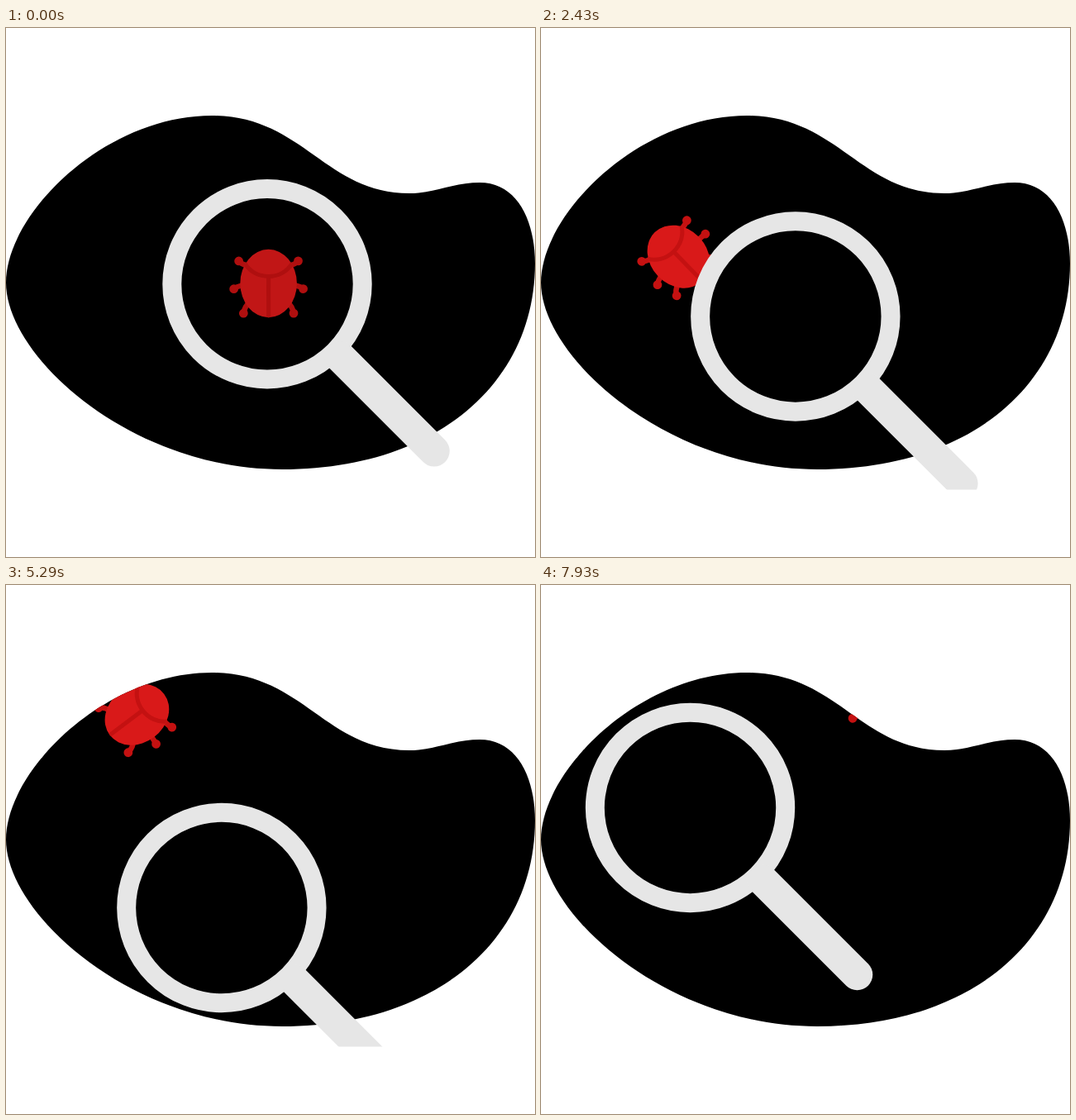
Animation, 640 px wide and 640 px high, one loop 8000 ms. Source, as an HTML page:

```html
<!DOCTYPE html>
<html lang="en">
<head>
<meta charset="utf-8">
<title>Bug hunt</title>
<style>
  html, body { margin: 0; width: 100%; height: 100%; overflow: hidden; background: #fff; }
  svg { display: block; width: 100%; height: 100%; }
  .dark { fill: none; stroke: #c41111; stroke-width: 5; }
  .leg { fill: none; stroke: #c41111; stroke-width: 6.5; stroke-linecap: round; }
  .foot { fill: #c41111; }
  .metal { fill: none; stroke: #e6e6e6; }
</style>
</head>
<body>
<svg viewBox="0 0 640 640">
  <defs>
    <path id="blob" d="M0 308C0 225 119 106 249 106C359 106 386 200 488 200C518 200 542 187 573 187
      C618 187 640 232 640 285C640 430 520 534 334 534C152 534 0 398 0 308Z"/>
    <clipPath id="inBlob"><use href="#blob"/></clipPath>
    <clipPath id="inStage"><rect width="640" height="558.4"/></clipPath>
    <clipPath id="inShell"><ellipse rx="34.3" ry="41.2"/></clipPath>
  </defs>
  <use href="#blob"/>
  <g clip-path="url(#inBlob)">
    <g id="bug">
      <g id="legs"></g>
      <ellipse rx="34.3" ry="41.2" fill="#d91919"/>
      <path class="dark" clip-path="url(#inShell)" d="M-29 -25C-17 -3 17 -3 29 -25M0 -8V42"/>
    </g>
  </g>
  <g clip-path="url(#inStage)">
    <g id="lens">
      <circle r="104" fill="#000" fill-opacity=".11"/>
      <circle class="metal" r="115.2" stroke-width="23"/>
      <path class="metal" d="M88 88L202 202" stroke-width="37.5" stroke-linecap="round"/>
    </g>
  </g>
</svg>
<script>
const LOOP = 8000;

// Waypoints: time, x, y
const lensPath = [
  [0, 316, 309.8], [1640, 312.5, 334], [3210, 300.7, 363.5], [4570, 280.4, 383],
  [6000, 234.5, 383.5], [6930, 187.2, 332.5], [7930, 180.5, 269.5]
];

// Waypoints: time, x, y, heading
const bugPath = [
  [0, 317.7, 309, 0], [1640, 204, 282.8, -76], [3210, 140, 264.7, 0], [4290, 120, 221, 29],
  [4570, 119, 199, 37], [6000, 223, 131, 64], [7930, 406, 124, 78]
];

const byId = id => document.getElementById(id);

// Smooth curve through the waypoints: Hermite segments with parabolic slopes
function sample(path, time) {
  const last = path.length - 1;
  const chord = (i, c) => (path[i + 1][c] - path[i][c]) / (path[i + 1][0] - path[i][0]);
  const slope = (i, c) => {
    if (i === 0) return 2 * chord(0, c) - slope(1, c);
    if (i === last) return 2 * chord(last - 1, c) - slope(last - 1, c);
    const share = (path[i][0] - path[i - 1][0]) / (path[i + 1][0] - path[i - 1][0]);
    return chord(i - 1, c) * (1 - share) + chord(i, c) * share;
  };
  let i = 0;
  while (i < last - 1 && time >= path[i + 1][0]) i++;
  const a = path[i], b = path[i + 1], span = b[0] - a[0];
  const u = (time - a[0]) / span, v = 1 - u;
  return a.slice(1).map((from, k) =>
    v * v * (1 + 2 * u) * from + u * u * (1 + 2 * v) * b[k + 1] +
    span * u * v * (v * slope(i, k + 1) - u * slope(i + 1, k + 1)));
}

function addShape(tag, className) {
  const shape = document.createElementNS("http://www.w3.org/2000/svg", tag);
  shape.setAttribute("class", className);
  return byId("legs").appendChild(shape);
}

// Mirrored pairs; the swing in degrees differs between the two sides
const pairs = [
  { angle: -37, reach: 45, swing: { right: 4, left: 0 } },
  { angle: 9, reach: 42.5, swing: { right: -5, left: 0 } },
  { angle: 50, reach: 47.2, swing: { right: 0, left: -7 } }
];

const legs = pairs.flatMap(({ angle, reach, swing }) => ["right", "left"].map(side => ({
  angle, reach, swing: swing[side], mirror: side === "right" ? 1 : -1,
  foot: addShape("circle", "foot"), limb: addShape("path", "leg")
})));

function polar(radius, degrees, mirror) {
  const radians = degrees * Math.PI / 180;
  return [mirror * radius * Math.cos(radians), radius * Math.sin(radians)];
}

function drawLegs(amount) {
  for (const { angle, reach, swing, mirror, foot, limb } of legs) {
    const [hipX, hipY] = polar(reach * 0.7, angle - 5, mirror);
    const [x, y] = polar(reach, angle + swing * amount, mirror);
    const bendX = hipX + (x - hipX) * 0.75, bendY = hipY + (y - hipY) * 0.3;
    foot.setAttribute("r", 5.4);
    foot.setAttribute("cx", x);
    foot.setAttribute("cy", y);
    limb.setAttribute("d", `M${hipX} ${hipY}Q${bendX} ${bendY} ${x} ${y}`);
  }
}

function draw(now) {
  const time = now % LOOP;
  const [lensX, lensY] = sample(lensPath, time);
  const [x, y, heading] = sample(bugPath, time);
  byId("lens").setAttribute("transform", `translate(${lensX} ${lensY})`);
  byId("bug").setAttribute("transform", `translate(${x} ${y}) rotate(${heading})`);
  drawLegs(Math.min(1, 1.3 * Math.sin(Math.PI * time / LOOP)));
}

const start = performance.now();
function tick() {
  draw(performance.now() - start);
  requestAnimationFrame(tick);
}
tick();
</script>
</body>
</html>
```
